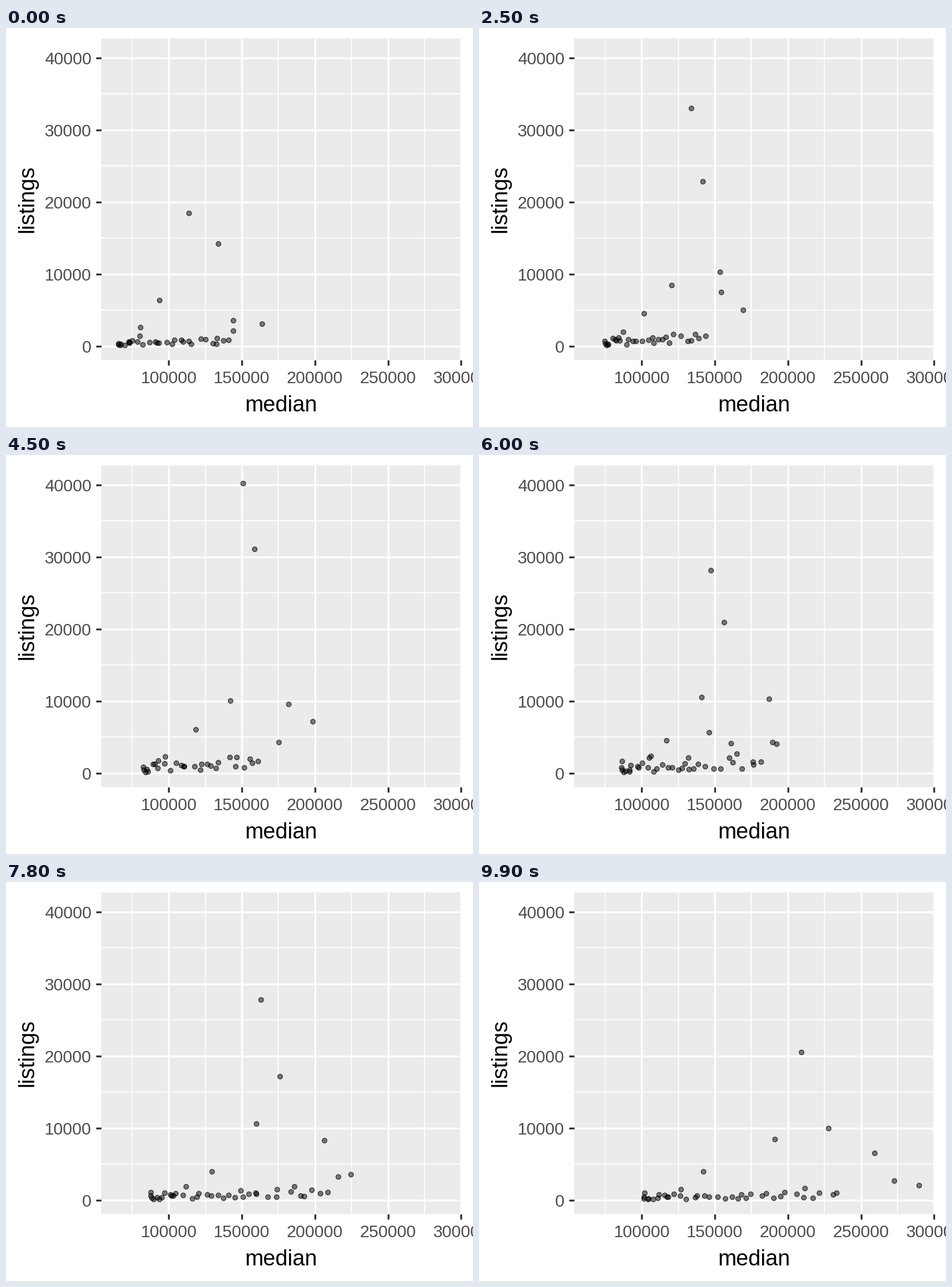
These frames come from a looping animation (810x692 px, 10 s). A matplotlib script:

```python
import matplotlib.pyplot as plt
import numpy as np
from matplotlib.animation import FuncAnimation
from matplotlib.patches import Rectangle

W, H, DPI = 810, 692, 100
FRAMES, STEP_MS = 100, 100
LEFT, RIGHT, TOP, BOTTOM = 165, 791, 18, 576
ZERO_Y = 552
PX = 72 / DPI  # points per pixel

plt.rcParams["font.family"] = "Liberation Sans"
fig = plt.figure(figsize=(W / 100, H / 100), dpi=DPI, facecolor="white")
ax = fig.add_axes([0, 0, 1, 1])
ax.set_xlim(0, W)
ax.set_ylim(H, 0)
ax.axis("off")


# ---- chart frame ----
def line(x0, y0, x1, y1, width, color="white"):
    ax.plot([x0, x1], [y0, y1], color=color, lw=width * PX,
            solid_capstyle="butt", zorder=1)


def label(x, y, text, size, color, **kw):
    ax.text(x, y, text, fontsize=size * PX, color=color, va="baseline", **kw)


def draw_axes():
    ax.add_patch(Rectangle((LEFT, TOP), RIGHT - LEFT, BOTTOM - TOP,
                           fc="#EBEBEB", ec="none", zorder=0))
    xs = [282.3 + 126.75 * k for k in range(5)]
    ys = [ZERO_Y - 125.1 * k for k in range(5)]
    for x in xs:
        line(x - 63.4, TOP, x - 63.4, BOTTOM, 1.7)
    for y in ys[1:]:
        line(LEFT, y + 62.5, RIGHT, y + 62.5, 1.7)
    for k, x in enumerate(xs):
        line(x, TOP, x, BOTTOM, 3.3)
        line(x, BOTTOM, x, BOTTOM + 9, 3.3, "#333333")
        label(x, 616.3, str(100000 + 50000 * k), 29.33, "#4D4D4D", ha="center")
    for k, y in enumerate(ys):
        line(LEFT, y, RIGHT, y, 3.3)
        line(LEFT - 9, y, LEFT, y, 3.3, "#333333")
        label(148.3, y + 11.2, str(10000 * k), 29.33, "#4D4D4D", ha="right")
    label(477.3, 665, "median", 38.2, "black", ha="center")
    label(47.4, 296.5, "listings", 38.2, "black", ha="center",
          rotation=90, rotation_mode="anchor")


# ---- leaders: the few large markets, as (step, x, y) key points ----
LEADERS = [np.array(keys, float).T for keys in (
    [(0, 316, 320), (13, 340, 276), (20, 358, 178), (26, 369, 131),
     (46, 413, 44), (53, 405, 68), (59, 401, 152), (66, 413, 94),
     (79, 444, 213), (86, 482, 294), (99, 558, 294)],
    [(0, 367, 373), (25, 387, 265), (46, 433, 157), (59, 422, 247),
     (66, 426, 250), (86, 507, 394), (99, 605, 426)],
    [(0, 265, 471), (46, 391, 424), (59, 402, 399), (69, 409, 397),
     (86, 455, 438), (99, 512, 445)],
    [(0, 443, 512), (20, 476, 498), (25, 457, 488), (45, 531, 461),
     (59, 546, 494), (69, 555, 491), (86, 635, 521), (99, 762, 525)],
    [(0, 232, 518), (45, 328, 475), (66, 313, 494), (86, 386, 506),
     (99, 388, 501)],
    [(0, 393, 506), (25, 417, 422), (45, 489, 431), (69, 510, 417),
     (86, 588, 475), (99, 685, 469)],
    [(0, 393, 524), (25, 419, 457), (45, 472, 497), (69, 530, 498),
     (86, 615, 522), (99, 719, 517)],
)]

# ---- crowd: small markets, spread evenly by rank ----
CROWD, EARLY_CROWD = 38, 30
YEARS = np.round(np.linspace(0, FRAMES - 1, 16))
TRADE = 59, 66            # leaders and crowd dots swap places here
PARTNERS = [6, 3, 2, 4, 1]  # crowd dots that swap with the first leaders

rng = np.random.default_rng(7)
rank = np.arange(CROWD) * 0.618034 % 1
bulk = 0.6 * rng.normal(size=CROWD) + 0.8 * (rank - 0.5)
noise = rng.normal(size=(len(YEARS), CROWD, 2))


def leaders_at(t):
    return np.array([[np.interp(t, k[0], k[1]), np.interp(t, k[0], k[2])]
                     for k in LEADERS])


def crowd_at(t):
    year = np.interp(t, YEARS, np.arange(len(YEARS)))
    k = min(int(year), len(YEARS) - 2)
    wobble = noise[k] + (noise[k + 1] - noise[k]) * (year - k)

    keys = [0, 25, 45, 69, 86, 99]
    lo = np.interp(t, keys, [194, 217, 237, 252, 249, 285])
    hi = np.interp(t, keys, [394, 394, 447, 530, 602, 637])
    size = np.interp(t, [0, 45, 69, 99], [9, 17, 13, 9])
    x = lo + (hi - lo) * rank ** 1.5 + 5 * wobble[:, 0] * np.sqrt(rank)
    height = np.clip(size * np.exp(bulk + 0.12 * wobble[:, 1]), 2.5, 50)
    return np.column_stack([x, ZERO_Y - height])


def dots_at(t):
    big, small = leaders_at(t), crowd_at(t)
    u = np.interp(t, TRADE, [0, 1])
    n = len(PARTNERS)
    a, b = big[:n].copy(), small[PARTNERS]
    big[:n] = a + (b - a) * u
    small[PARTNERS] = b + (a - b) * u
    count = EARLY_CROWD if t < TRADE[0] else CROWD
    return np.vstack([big, small[:count]]) + 0.5


draw_axes()
dots = ax.scatter([], [], s=(8.4 * PX) ** 2, facecolors=(0, 0, 0, 0.5),
                  edgecolors=(0, 0, 0, 0.7), linewidths=1.2 * PX, zorder=3)


def update(i):
    dots.set_offsets(dots_at(i))
    return (dots,)


anim = FuncAnimation(fig, update, frames=FRAMES, interval=STEP_MS,
                     repeat=True, repeat_delay=0, blit=False)
plt.show()
```
